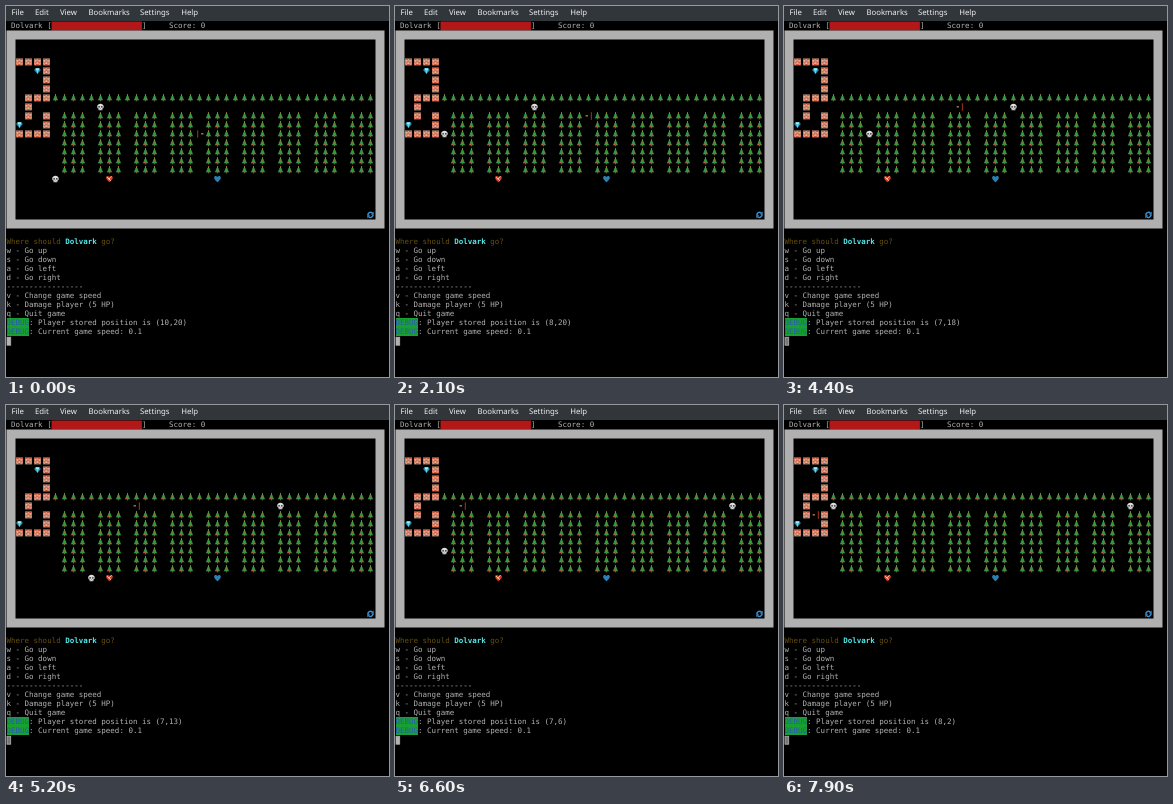
These frames come from a looping animation (383 by 371 pixels, 8 s). An HTML page:

```html
<!DOCTYPE html>
<html lang="en">
<head>
<meta charset="utf-8">
<title>Terminal game</title>
<style>
html, body { margin: 0; width: 100%; height: 100%; overflow: hidden; background: #000; }
body { position: relative; text-rendering: geometricPrecision; }
nav { position: absolute; left: 0; top: 0; width: 100%; height: 15px; background: #31363b;
  color: #eff0f1; font: 7.8px/15px "Noto Sans", sans-serif; }
nav span { position: absolute; top: -.5px; white-space: pre; }
pre { position: absolute; left: .5px; margin: 0; color: #b2b2b2;
  font: 7.5px/9px "DejaVu Sans Mono", monospace; }
svg { position: absolute; left: 0; top: 0; }
#status { top: 15px; }
#prompt { top: 231px; }
.ask { color: #66500f; }
.name { color: #54e8e8; }
.tag { color: #2a58b8; background: #18a030; }
.sprite { transform: translate(.6px, 1px) scale(.86); }
#cursor { fill: #b2b2b2; stroke: #b2b2b2; stroke-width: .8; }
#cursor.dim { fill: #777; }
#player { font: bold 7.5px "DejaVu Sans Mono", monospace; }
</style>
</head>
<body>
<nav>
  <span style="left:5.4px">File</span><span style="left:28.9px">Edit</span>
  <span style="left:53.9px">View</span><span style="left:82.4px">Bookmarks</span>
  <span style="left:133.9px">Settings</span><span style="left:175.2px">Help</span>
</nav>
<pre id="status"> Dolvark [                    ]     Score: 0</pre>

<pre id="prompt"><span class="ask">Where should </span><b class="name">Dolvark</b><span class="ask"> go?</span>
w - Go up
s - Go down
a - Go left
d - Go right
-----------------
v - Change game speed
k - Damage player (5 HP)
q - Quit game
<span class="tag">DEBUG</span>: Player stored position is (<span id="pos">10,20</span>)
<span class="tag">DEBUG</span>: Current game speed: 0.1</pre>

<svg width="383" height="371">
  <defs>
    <g id="brick" class="sprite">
      <path fill="#e4c0ac" d="M.5.7h8v7.8h-8z"/>
      <path fill="#c8583c" d="M.6 1h3.1v1.4H.6zM4.7 1h3.7v1.4H4.7zM.6 3h1.4v1.3H.6zM2.8 3h3.3v1.3H2.8zM6.9 3h1.5v1.3H6.9zM.6 5h3.1v1.3H.6zM4.7 5h3.7v1.3H4.7zM.6 6.9h1.4v1.3H.6zM2.8 6.9h3.3v1.3H2.8zM6.9 6.9h1.5v1.3H6.9z"/>
    </g>
    <g id="gem" class="sprite">
      <path fill="#2592b8" d="M2.3 1.4h4.4L8.4 3.6 4.5 8.2.6 3.6z"/>
      <path fill="#9ff0f6" d="M2.3 1.4h4.4L6 3.6H3z"/>
      <path fill="#5fd6ea" d="M3 3.6h3L4.5 8.2z"/>
    </g>
    <g id="tree" class="sprite">
      <path fill="#8a4a2a" d="M3.7 7h1.6v1.6H3.7z"/>
      <path fill="#2e9a45" d="M4.5.8 6.1 3.3H5.6L6.9 5.2H6.3L7.8 7.3H1.2L2.7 5.2H2.1L3.4 3.3H2.9z"/>
      <g fill="#e0483a"><circle cx="4.2" cy="3.9" r=".55"/><circle cx="5.5" cy="5.4" r=".55"/><circle cx="3.2" cy="6.4" r=".6"/><circle cx="6" cy="6.8" r=".45"/></g>
      <circle cx="4.5" cy="1" r=".6" fill="#e8c040"/>
    </g>
    <g id="skull" class="sprite">
      <path fill="#dcdcdc" d="M4.5.8C7 .8 8.3 2.4 8.3 4.3 8.3 5.6 7.5 6.2 6.7 6.5V8.3H2.3V6.5C1.5 6.2.7 5.6.7 4.3.7 2.4 2 .8 4.5.8z"/>
      <g fill="#333"><circle cx="2.9" cy="4.4" r="1"/><circle cx="6.1" cy="4.4" r="1"/><path d="M4.5 5.4l.5.9H4zM3.5 7.3h.4v1h-.4zM5.1 7.3h.4v1h-.4z"/></g>
    </g>
    <path id="heart" d="M4.5 8.3C2.6 6.8.6 5.2.6 3.2.6 1 3.4.5 4.5 2.4 5.6.5 8.4 1 8.4 3.2 8.4 5.2 6.4 6.8 4.5 8.3z"/>
    <g id="gift" class="sprite">
      <use href="#heart" fill="#d83a30"/>
      <path d="M1.5 2.4 6.2 6.6M6.8 1.6 3.4 5" stroke="#f4d890" stroke-width="1.1"/>
    </g>
    <g id="blue" class="sprite"><use href="#heart" fill="#2a80b4"/></g>
    <g id="portal" class="sprite">
      <path fill="none" stroke="#3a8fd0" stroke-width="1.9" d="M1.6 5A3 3 0 0 1 6.6 2.3M7.4 4A3 3 0 0 1 2.4 6.7"/>
      <path fill="#3a8fd0" d="M8.2.7v3.4H4.8zM.8 8.3V4.9h3.4z"/>
    </g>
  </defs>
  <path fill="#b21818" d="M45.5 15.5h90.4v9H45.5z"/>
  <path fill="#b0b0b0" fill-rule="evenodd" d="M.5 24.5h378v198H.5zm9 9v180h360v-180z"/>
  <g transform="translate(0 24)">
    <g id="map"></g>
    <use id="runner" href="#skull"/>
    <use id="guard" href="#skull"/>
    <text id="player" x=".4" y="7"><tspan id="p1"></tspan><tspan id="p2"></tspan></text>
  </g>
  <rect id="cursor" x="1" y="331.2" width="3.7" height="8"/>
</svg>

<script>
const LOOP = 8000, CELL = 9;
const $ = id => document.getElementById(id);
const map = $('map');

function put(kind, col, row) {
  const u = document.createElementNS('http://www.w3.org/2000/svg', 'use');
  u.setAttribute('href', '#' + kind);
  move(u, col, row);
  map.append(u);
}
function move(el, col, row) {
  el.setAttribute('transform', `translate(${col * CELL} ${row * CELL})`);
}

// House, starting at row 3, column 1
const house = ['####', '  *#', '   #', '   #', ' ###', ' #', ' # #', '*  #', '####'];
house.forEach((line, r) => [...line].forEach((ch, c) => {
  if (ch !== ' ') put(ch === '#' ? 'brick' : 'gem', c + 1, r + 3);
}));

// Hedge and orchard
for (let c = 5; c <= 40; c++) {
  put('tree', c, 7);
  if (c % 4 !== 1) for (let r = 9; r <= 15; r++) put('tree', c, r);
}
put('gift', 11, 16);
put('blue', 23, 16);
put('portal', 40, 20);

// Moments (ms) at which the game advances one turn
const turns = [700, 900, 1200, 1800, 2100, 2300, 2700, 2900, 3100, 3200, 3400,
  3600, 3900, 4200, 4400, 4600, 4700, 4900, 5000, 5200, 5700, 5900, 6000, 6200,
  6400, 6500, 6600, 6800, 6900, 7000, 7400, 7800];

// Patrol around the first orchard block: up, right, down, left
function guardAt(n) {
  const p = n % 24;
  if (p < 8) return [5, 16 - p];
  if (p < 12) return [p - 3, 8];
  if (p < 20) return [9, p - 4];
  return [29 - p, 16];
}

// Stored [row, column] of the player
function playerAt(n) {
  if (n < 13) return [10 - Math.min(n, 2), 20];
  if (n < 32) return [7, 33 - n];
  return [8, 2];
}

let last = -1;
function draw(n) {
  move($('runner'), n <= 30 ? 10 + n : 70 - n, 8);
  move($('guard'), ...guardAt(n));
  const [row, col] = playerAt(n);
  move($('player'), col + 1, row + 1);
  const glyphs = n < 3 ? '|-' : '-|';
  [$('p1'), $('p2')].forEach((el, i) => {
    el.textContent = glyphs[i];
    el.setAttribute('fill', glyphs[i] === '|' ? '#d03c22' : '#e0a068');
  });
  $('pos').textContent = row + ',' + col;
}

function frame(now) {
  const t = now % LOOP;
  const n = turns.filter(at => at <= t).length;
  if (n !== last) draw(last = n);
  const dim = (t >= 3200 && t < 5800) || t >= 7400;
  $('cursor').classList.toggle('dim', dim);
  requestAnimationFrame(frame);
}
draw(0);
requestAnimationFrame(frame);
</script>
</body>
</html>
```
